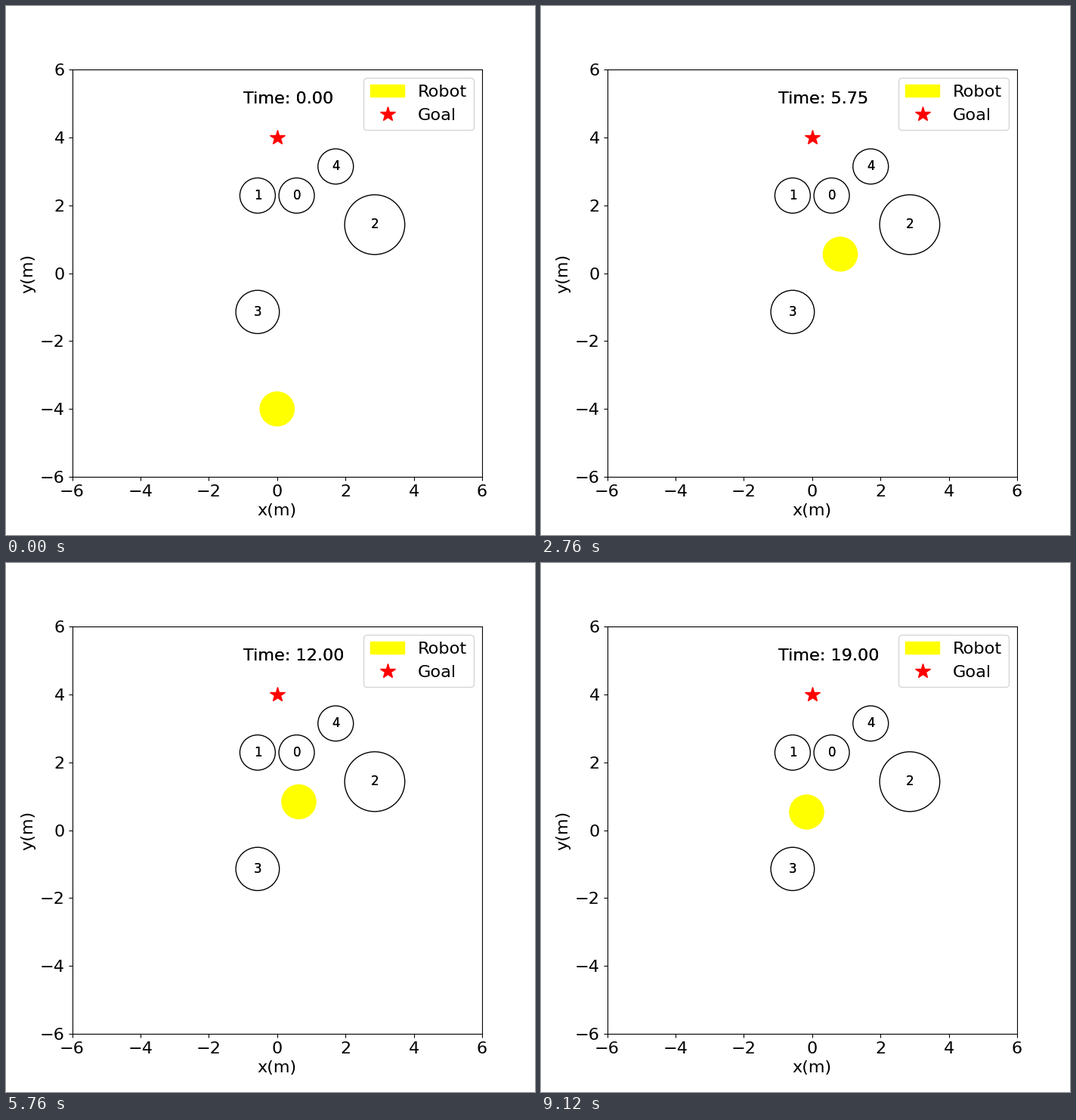
A matplotlib script that plays this animation: 700 px wide and 700 px high, repeating every 9240 ms.

```python
import matplotlib.pyplot as plt
from matplotlib.animation import FuncAnimation
from matplotlib.lines import Line2D
from matplotlib.patches import Circle

FRAMES = 77
INTERVAL = 120
STEP = 0.25  # simulated seconds per frame
CELL = 2 / 7  # obstacle centres lie on this grid
SHIFT = 0.11  # label offset inside a circle
SIZE = 16.1  # just large enough for the hinter to round glyphs up
SMALL = 0.519

plt.rcParams["font.family"] = "DejaVu Sans"

# Column, row, radius
OBSTACLES = [(2, 8, SMALL), (-2, 8, SMALL), (10, 5, 0.88),
             (-2, -4, 0.637), (6, 11, SMALL)]

# Step reached, x, y, slowing on the way there (1 is steady)
STOPS = [
    (0, 0.0, -4.0, 1),
    (8, 0.824, -2.08, 1),      # diagonally past circle 3
    (23, 0.824, 0.56, 1.36),   # straight up, slowing down
    (32, 0.654, 0.79, 1),      # hesitating below the gap
    (35, 0.757, 0.89, 1),
    (48, 0.636, 0.835, 1.36),
    (57, -0.160, 0.534, 1.36),  # off to the left, then at rest
]


def robot_pos(step):
    for (s0, x0, y0, _), (s1, x1, y1, slow) in zip(STOPS, STOPS[1:]):
        if step <= s1:
            u = 1 - (1 - (step - s0) / (s1 - s0)) ** slow
            return x0 + (x1 - x0) * u, y0 + (y1 - y0) * u
    return x1, y1


def bold_text(x, y, label, size):
    """Text painted twice, which thickens its smooth edges."""
    text = ax.text(x, y, label, fontsize=size, color="black")
    ax.add_artist(text)
    return text


fig, ax = plt.subplots(figsize=(7, 7), dpi=100)
ax.tick_params(labelsize=SIZE)
ax.set(xlim=(-6, 6), ylim=(-6, 6))
ax.set_xlabel("x(m)", fontsize=SIZE)
ax.set_ylabel("y(m)", fontsize=SIZE)

robot = ax.add_artist(Circle(robot_pos(0), 0.5, color="yellow"))
goal = ax.add_artist(Line2D([0], [4], color="red", marker="*",
                            linestyle="None", markersize=15))
ax.legend([robot, goal], ["Robot", "Goal"], fontsize=SIZE, loc="upper right")

for i, (col, row, radius) in enumerate(OBSTACLES):
    x, y = col * CELL, row * CELL
    ax.add_artist(Circle((x, y), radius, fill=False))
    bold_text(x - SHIFT, y - SHIFT, str(i), 12)

clock = bold_text(-1, 5, "Time: 0.00", SIZE)


def update(frame):
    robot.center = robot_pos(frame)
    clock.set_text(f"Time: {frame * STEP:.2f}")
    return robot, clock


anim = FuncAnimation(fig, update, frames=FRAMES, interval=INTERVAL,
                     repeat=True, repeat_delay=0)
plt.show()
```
